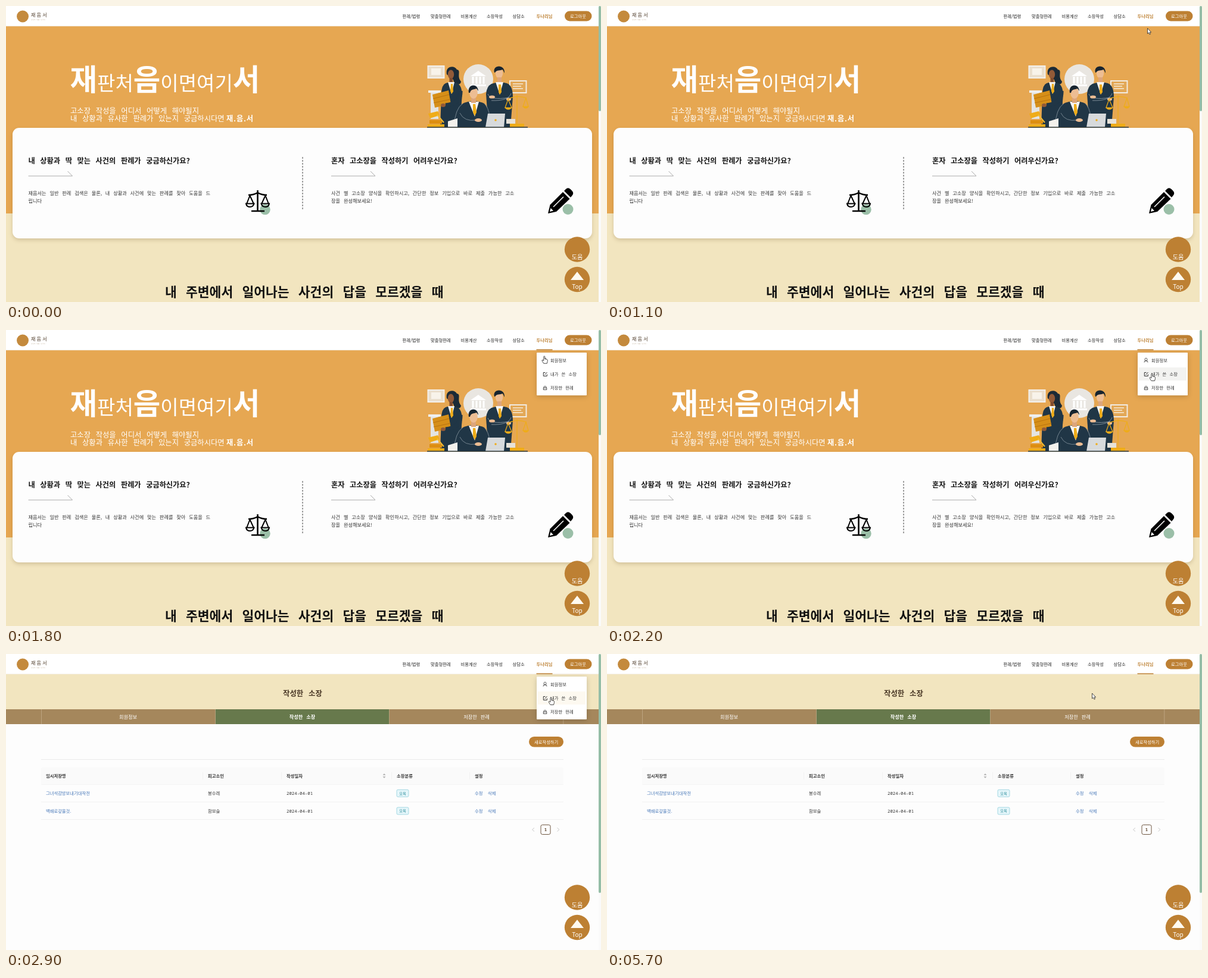
Recreate the animation shown at these times as an HTML page. Size 999 by 498 pixels, loop 5.8 s.

```html
<!DOCTYPE html>
<html lang="ko">
<head>
<meta charset="utf-8">
<title>재음서</title>
<style>
html, body { margin: 0; width: 100%; height: 100%; overflow: hidden; background: #fdfdfd; }
svg { display: block; width: 100vw; height: 100vh; }
text { font-family: "Noto Sans CJK KR", "Noto Sans CJK JP", "Noto Sans CJK", sans-serif; word-spacing: .43em; white-space: pre; }
.latin { font-family: "Noto Sans Mono", monospace; }
.dots { letter-spacing: .07em; }
.card { filter: drop-shadow(0 3px 3px rgba(90, 60, 10, .2)); }
.pop { filter: drop-shadow(0 2px 4px rgba(0, 0, 0, .18)); }
</style>
</head>
<body>
<svg id="stage" viewBox="0 0 999 498" preserveAspectRatio="none"></svg>
<script>
const BROWN = '#bd8033', NAVY = '#203646', GOLD = '#efac18', LINK = '#4677b8', SMALL = 7.3;

const rect = (x, y, w, h, fill, r = 0, more = '') =>
  `<rect x="${x}" y="${y}" width="${w}" height="${h}" rx="${r}" fill="${fill}" ${more}/>`;
const circle = (x, y, r, fill) => `<circle cx="${x}" cy="${y}" r="${r}" fill="${fill}"/>`;
const oval = (x, y, rx, ry, fill) => `<ellipse cx="${x}" cy="${y}" rx="${rx}" ry="${ry}" fill="${fill}"/>`;
const shape = (d, fill) => `<path d="${d}" fill="${fill}"/>`;
const stroke = (d, color, w = 1, more = '') =>
  `<path d="${d}" fill="none" stroke="${color}" stroke-width="${w}" ${more}/>`;
const group = (id, body) => `<g id="${id}">${body}</g>`;
// y is the middle of the line of text
const text = (x, y, size, str, fill = '#222', weight = 400, more = '') =>
  `<text x="${x}" y="${y + size * .37}" font-size="${size}" font-weight="${weight}" fill="${fill}" ${more}>${str}</text>`;
const mid = 'text-anchor="middle"';

function header() {
  const nav = [[665.5, '판례/법령'], [713, '맞춤형판례'], [763.5, '비용계산'], [807, '소장작성'], [850.5, '상담소']];
  return rect(0, 0, 995, 34, '#fff') + rect(0, 33.5, 995, .7, '#eee6d8') +
    circle(28, 17.5, 10, '#c48a3d') +
    text(42, 15.3, 8, '재 음 서', '#4b3826', 500, 'style="word-spacing:0"') +
    text(42, 23.3, 2.7, '나만의 법률 도우미', '#c9bba8') +
    nav.map(([x, s]) => text(x, 17.3, SMALL, s)).join('') +
    text(890.5, 17.3, SMALL, '두나리님', BROWN, 700) +
    rect(938, 8.5, 45.5, 17, BROWN, 8.5) + text(947, 17, SMALL, '로그아웃', '#fff');
}

function people() {
  const wall =
    rect(708.5, 101, 27, 20, '#eadfce', 0, 'stroke="#f4f1ec" stroke-width="2"') + rect(714, 105, 16, 11, '#f8f3ea') +
    rect(846, 126, 27.5, 20, '#e3a857', 0, 'stroke="#f1ebe2" stroke-width="2"') +
    stroke('M851 131H868M851 135H865M851 139H868', '#f6ead7', 1.3) +
    circle(793, 123, 25, '#e9e6e1') + shape('M780 118L793 109L806 118Z', '#fff') +
    stroke('M784 119V131M790 119V131M796 119V131M802 119V131', '#fff', 3) + rect(780, 132, 26, 3, '#fff') +
    rect(709, 142, 21, 4, '#efefef') + rect(713, 146, 13, 44, '#e4e4e2');
  const woman =
    shape('M740 115C737 101 753 99 757 107C765 108 756 118 764 127C763 136 751 131 751 124Z', '#1b2a36') +
    oval(747, 115, 5.2, 7.5, '#925a38') + rect(744.5, 121, 5.5, 9, '#814c2e') +
    shape('M738 130Q747 126 758 130Q768 136 765 160L763 204H729L731 148Q731 133 738 130Z', NAVY) +
    shape('M742 128L748 148L753 128Z', '#f4f1ec') + shape('M747 131L750 131L751 144L748 148L746 143Z', GOLD) +
    shape('M716 149L743 142L747 165L720 171Z', '#d68f18') + stroke('M717 156L744 149M718 163L746 157', '#b9730e') +
    stroke('M763 143Q764 164 738 167', NAVY, 7) + oval(734, 167, 4, 3, '#925a38');
  const tall =
    oval(828, 113, 6.2, 9, '#edbd93') + shape('M820 112C816 99 838 97 837 113L834 107C829 109 824 107 821 112Z', '#17242f') +
    rect(825, 120, 7, 10, '#dda57c') +
    shape('M815 131Q828 126 841 130Q851 134 851 153L847 204H810L806 148Q807 135 815 131Z', NAVY) +
    shape('M822 128L829 149L835 128Z', '#f7f5f2') + shape('M827 132H831L832 145L829 149L827 145Z', GOLD) +
    stroke('M809 148Q812 159 845 154M848 147Q844 160 815 159', '#8796a0', .9) +
    oval(816, 153, 5, 2.6, '#edbd93') + oval(844, 157, 4, 2.4, '#edbd93');
  const seated =
    shape('M767 164Q785 156 803 164Q812 173 813 204H752Q754 172 767 164Z', NAVY) +
    stroke('M767 164Q754 172 752 204M803 164Q810 170 812 186M762 180Q769 195 790 192', '#8796a0', .8) +
    shape('M777 161L787 186L794 161Z', '#f7f5f2') + rect(781, 152, 8, 11, '#dca57b') +
    oval(785, 146, 6.8, 10, '#edbd93') +
    shape('M777 146C774 131 792 129 793 143L790 139C785 141 781 139 779 146Z', '#17242f') +
    shape('M784 165H788L790 179L787 185L784 179Z', GOLD) +
    oval(793, 192, 6, 3, '#edbd93');
  const desk =
    shape('M809 181H838L836 204H805Z', '#d7dadc') + circle(822, 192, 1.8, GOLD) +
    rect(708, 199, 28, 5, GOLD) + rect(711, 192, 21, 6, '#dd8e11') + shape('M709 181L725 177L728 184L712 189Z', GOLD) +
    stroke('M724 183L735 196', '#f3bb33', 2) + shape('M742 204V194L758 189V204Z', '#f3f1ec') +
    stroke('M858 150V198M842 157Q858 149 874 155M843 157L838 171H849ZM873 155L868 169H877Z', GOLD, 1.2) +
    shape('M837 171H850Q843 178 837 171ZM867 169H878Q873 176 867 169Z', GOLD) +
    rect(846, 198, 24, 6, GOLD) + rect(840, 190, 15, 8, '#e7e2d8') + rect(707, 203.3, 169, 1.4, NAVY);
  return wall + woman + tall + seated + desk;
}

function card(x, title, lines) {
  return text(x, 260, 12.2, title, '#151515', 700) +
    stroke(`M${x} 286H${x + 74}L${x + 66} 278`, '#aaa', 1) +
    lines.map((s, i) => text(x, 315 + i * 12.5, 8.2, s, '#333')).join('');
}

function home() {
  const big = s => `<tspan font-size="49.5" font-weight="700">${s}</tspan>`;
  const scales =
    circle(435, 342.5, 8.7, '#9bbfa8') +
    stroke('M422.5 310V345M412 345H434M407 318Q416 318 422.5 314Q429 318 438 318', '#000', 2.6) +
    stroke('M409.5 319L404 333M409.5 319L416 333M435.5 319L429 333M435.5 319L441 333', '#000', 2) +
    stroke('M403 332.5H416.5Q415 338 409.7 338Q404 338 403 332.5ZM428.5 332.5H442Q441 338 435.3 338Q430 338 428.5 332.5Z', '#000', 2);
  const pencil =
    circle(943.5, 342, 9, '#9bbfa8') +
    shape('M910 349L913.5 334.5L935 313L946.5 324.5L924 346Z', '#000') +
    shape('M937 311L940 308Q943.5 304.5 947.5 308L950.5 311Q954 315 950.5 319L948 322Z', '#000') +
    stroke('M919 338L936 321', '#fff', 1.6) + shape('M913 346L914.5 340L919 344.5Z', '#fff');
  return rect(0, 34, 995, 315, '#e6a752') + rect(0, 349, 995, 149, '#f2e5bf') +
    `<text x="107.5" y="141.5" font-size="33" font-weight="300" fill="#fff">${big('재')}판처${big('음')}이면여기${big('서')}</text>` +
    text(108, 176, 12.3, '고소장 작성을 어디서 어떻게 해야될지', '#fff') +
    text(108, 189, 12.3, '내 상황과 유사한 판례가 있는지 궁금하시다면', '#fff') +
    text(370, 189, 12.2, '재.음.서', '#fff', 700, 'class="dots"') +
    people() +
    rect(11, 205, 973, 186, '#fdfdfd', 11, 'class="card"') +
    card(37.5, '내 상황과 딱 맞는 사건의 판례가 궁금하신가요?',
      ['재음서는 일반 판례 검색은 물론, 내 상황과 사건에 맞는 판례를 찾아 도움을 드', '립니다']) +
    card(546, '혼자 고소장을 작성하기 어려우신가요?',
      ['사건 별 고소장 양식을 확인하시고, 간단한 정보 기입으로 바로 제출 가능한 고소', '장을 완성해보세요!']) +
    stroke('M498 254V342', '#666', 1.2, 'stroke-dasharray="3 2"') +
    scales + pencil +
    text(267, 481.5, 21.5, '내 주변에서 일어나는 사건의 답을 모르겠을 때', '#111', 700);
}

function columns(xs, sortX) {
  const names = ['임시저장명', '피고소인', '작성일자', '소장분류', '설정'];
  return names.map((s, i) =>
    text(xs[i], 205.3, SMALL, s, '#333', 700) + (i ? rect(xs[i] - 9, 199, .6, 12, '#ececec') : '')).join('') +
    shape(`M${sortX - 2.5} 204L${sortX} 201L${sortX + 2.5} 204ZM${sortX - 2.5} 206L${sortX} 209L${sortX + 2.5} 206Z`, '#b5b5b5');
}

function row(y, title, who) {
  return text(67, y, SMALL, title, LINK) + text(339, y, SMALL, who, '#333') +
    text(471, y, 7.35, '2024-04-01', '#333', 400, 'class="latin"') +
    rect(656, y - 6, 20, 12, '#e5f6fa', 2, 'stroke="#85cbd8" stroke-width=".7"') +
    text(660.2, y, 6.2, '모욕', '#258898') +
    text(787, y, SMALL, '수정', LINK) + text(809, y, SMALL, '삭제', LINK) +
    rect(59, y + 14.3, 877, .7, '#ebebeb');
}

function list() {
  const empty = columns([67, 267, 441, 650, 824], 630) +
    oval(497.5, 262, 16, 3.5, '#f3f3f3') +
    '<path d="M485 254L490 245.5H505L510 254V264.5H485Z" fill="#fafafa" stroke="#d6d6d6" stroke-width=".8"/>' +
    stroke('M485 254H492Q493 258 497.5 258Q502 258 503 254H510', '#d6d6d6', .8) +
    text(497.5, 276.5, SMALL, '데이터 없음', '#b5b5b5', 400, mid) + rect(59, 307, 877, .7, '#ebebeb');
  const rows = columns([67, 339, 471, 656, 787], 635) +
    row(234.3, '그녀석감방보내기대작전', '봉수레') + row(264, '백배로갚을것.', '함보슬') +
    stroke('M887 292.5L883.5 295.5L887 298.5M925.5 292.5L929 295.5L925.5 298.5', '#c4c4c4', .9) +
    rect(898, 287.5, 16, 16, '#fff', 2.5, 'stroke="#5e442c" stroke-width=".9"') +
    text(906, 295.5, 7.3, '1', '#5e442c', 700, mid + ' class="latin"');
  return rect(0, 34, 995, 464, '#fdfdfd') + rect(0, 34, 995, 59, '#f2e5bf') +
    text(465, 66.3, 12.4, '작성한 소장', '#4a3826', 700) +
    rect(0, 93, 995, 25, '#a5875c') + rect(351.5, 93, 292, 25, '#67794c') +
    [59, 351, 643, 935.5].map(x => rect(x, 93, .7, 25, '#c6b08f')).join('') +
    text(205, 106, 8.2, '회원정보', '#fff', 400, mid) +
    text(497.5, 106, 8.2, '작성한 소장', '#fff', 700, mid) +
    text(790, 106, 8.2, '저장한 판례', '#fff', 400, mid) +
    rect(878, 139, 58, 17.5, BROWN, 8.7) + text(887, 148, SMALL, '새로작성하기', '#fff') +
    rect(59, 177, 877, .8, '#e6e6e6') + rect(59, 190.5, 877, 29.5, '#fafafa', 3) + rect(59, 219.5, 877, .6, '#f0f0f0') +
    group('empty', empty) + group('rows', rows);
}

const menu = () =>
  rect(891, 38, 84, 72, '#fff', 1, 'class="pop"') +
  rect(893, 63, 80, 22, '#f3f3f1', 1, 'id="hover"') +
  stroke('M903.3 49.7A1.8 1.8 0 1 1 906.7 49.7A1.8 1.8 0 1 1 903.3 49.7M902 54.5Q902 51.5 905 51.5Q908 51.5 908 54.5', '#333', .9) +
  stroke('M905.5 71.5H902.3V77.5H908.3V74.5M904.5 75.5L908.5 71', '#333', 1) +
  stroke('M902.3 97.5H907.8V100.5H902.3ZM903 97V95.5Q905 93.5 907 95.5V97', '#333', .9) +
  ['회원정보', '내가 쓴 소장', '저장한 판례'].map((s, i) => text(914, 51.3 + i * 23.2, SMALL, s, '#333')).join('');

const floating = () =>
  circle(959, 409.5, 21.2, BROWN) + text(959, 422.3, 10.2, '도움', '#fff', 400, mid) +
  circle(959, 460, 21.2, BROWN) + shape('M948 461L959 447L970 461Z', '#fffaf0') +
  text(959, 472.3, 10, 'Top', '#fff', 500, mid);

const outline = d => `<path d="${d}" fill="#fff" stroke="#222" stroke-width=".8" stroke-linejoin="round"/>`;
const arrow = outline('M0 0V9L2 7.2L3.5 10.3L5 9.6L3.6 6.7H6.2Z');
const hand = outline('M-1 .8Q0-.6 1 .8V5L4 5.5Q6 6 5.5 8.5L4.5 12.5H-1L-3.5 8.5Q-4.5 6.5-2.7 6.7L-1 8Z');

document.getElementById('stage').innerHTML =
  group('home', home()) + group('list', list()) + header() +
  rect(890.5, 32.5, 27, 1.5, BROWN, 0, 'id="under"') +
  floating() + group('menu', menu()) +
  rect(995, 0, 4, 498, '#fafafa') + rect(995, 0, 4, 177, '#94bda6', 2, 'id="thumb"') +
  group('arrow', arrow) + group('hand', hand);

// time, x, y of the pointer tip
const path = [
  [600, 950, 90], [800, 928, 56], [1000, 914, 43], [1200, 901, 32], [1400, 899.5, 31.5],
  [1700, 900, 34], [2100, 915, 73], [3500, 915, 73], [3700, 918, 42], [3800, 923, 20],
  [4000, 928.5, -1], [5600, 928.5, -1], [5700, 814.5, 66], [5800, 814.5, 66]
];
const fade = [[0, 0], [1200, 0], [1400, 1], [3700, 1], [4000, 0], [5800, 0]];

function at(keys, t) {
  const i = keys.findIndex(k => k[0] >= t);
  if (i < 1) return keys[0].slice(1);
  const a = keys[i - 1], b = keys[i], p = (t - a[0]) / (b[0] - a[0]);
  return a.slice(1).map((v, n) => v + (b[n + 1] - v) * p);
}

const $ = id => document.getElementById(id);
const show = (id, on) => { $(id).style.display = on ? '' : 'none'; };

function draw(now) {
  const t = Math.floor(now % 5800 / 100) * 100;
  const second = t >= 2300, loaded = t >= 2900;
  const [x, y] = at(path, t), [open] = at(fade, t);
  const pointing = t >= 1200 && t < 3800;
  show('home', !second);
  show('list', second);
  show('empty', !loaded);
  show('rows', loaded);
  show('under', second || t >= 1200);
  show('menu', open > 0);
  $('menu').style.opacity = open;
  show('hover', y > 61 && y < 85 && pointing);
  $('hover').setAttribute('fill', second ? '#fdf9f0' : '#f3f3f1');
  $('thumb').setAttribute('height', second ? 402 : 177);
  show('arrow', t >= 600 && !pointing);
  show('hand', pointing);
  for (const id of ['arrow', 'hand']) $(id).setAttribute('transform', `translate(${x} ${y})`);
}

const start = performance.now();
function tick() {
  draw(performance.now() - start);
  requestAnimationFrame(tick);
}
tick();
</script>
</body>
</html>
```
